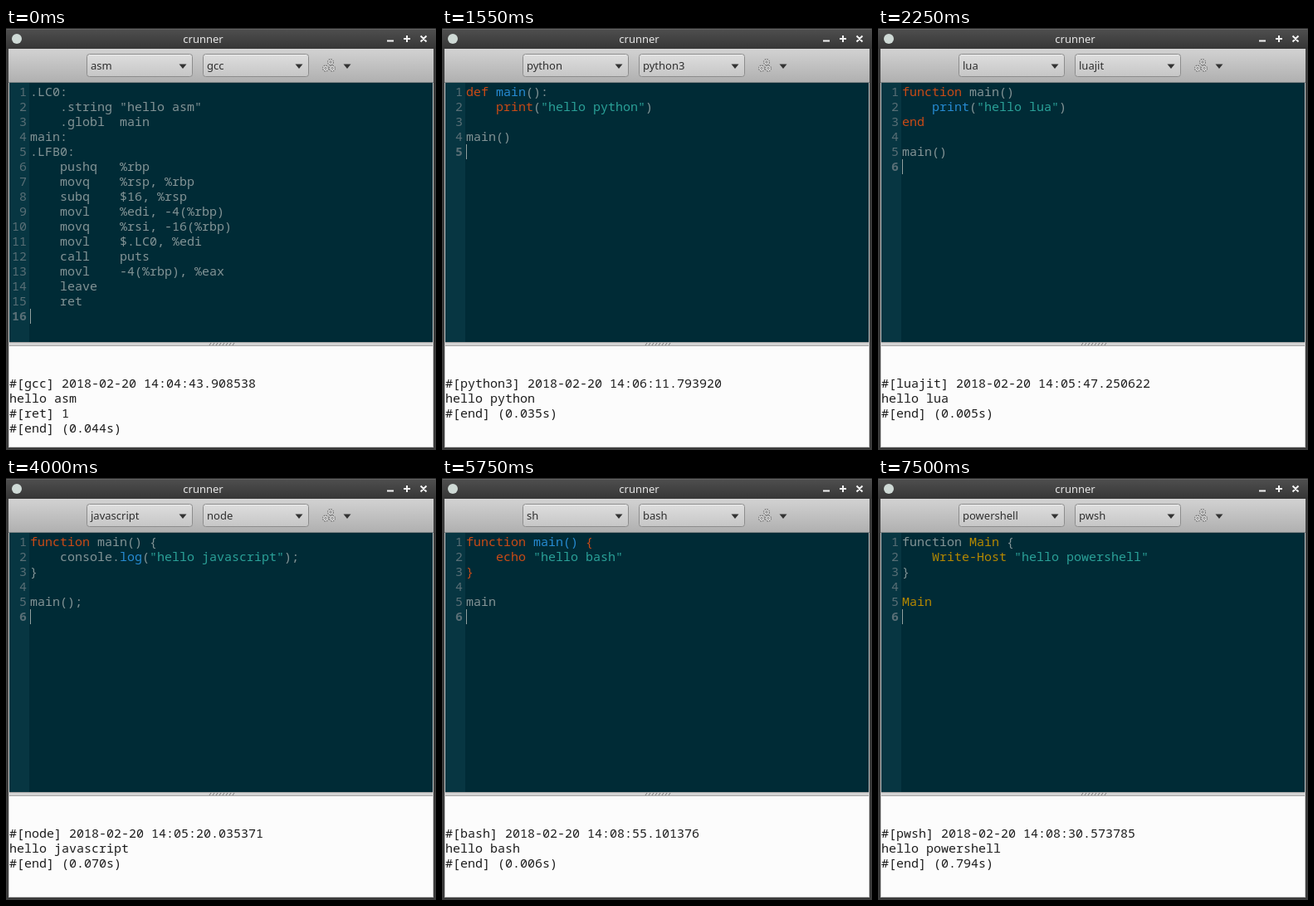
An HTML page for the animation above (8000 ms loop, 518 px wide and 508 px high).

```html
<!DOCTYPE html>
<html lang="en">
<head>
<meta charset="utf-8">
<title>crunner</title>
<style>
html, body { margin: 0; width: 100%; height: 100%; overflow: hidden; background: #3c3c3c; }
.window { position: relative; width: 518px; height: 508px; overflow: hidden; }
.window svg { position: absolute; left: 0; top: 0; }
.title { position: absolute; left: 0; top: 0; width: 475px; text-align: center; color: #e6e6e6; }
.title, .pick { font: 13px/26px "Noto Sans", "Open Sans", sans-serif; }
.pick { position: absolute; top: 32px; color: #2f2f2f; }
.lang { left: 102px; }
.tool { left: 242px; }

.reel { position: absolute; left: 0; top: 0; animation: reel 8s step-end infinite; }
.scene { position: relative; width: 518px; height: 508px; overflow: hidden; }
@keyframes reel {
  0% { transform: translateY(0); }
  6.25% { transform: translateY(-508px); }
  28.125% { transform: translateY(-1016px); }
  50% { transform: translateY(-1524px); }
  71.875% { transform: translateY(-2032px); }
  93.75%, 100% { transform: translateY(-2540px); }
}

.code, .out {
  position: absolute; margin: 0; white-space: pre;
  font: 15px/18px "Noto Sans Mono", "DejaVu Sans Mono", monospace;
  font-variant-ligatures: none;
}
.code { left: 29px; top: 67px; color: #839496; counter-reset: line; }
.code div { position: relative; height: 18px; counter-increment: line; }
.code div::before {
  content: counter(line); position: absolute; left: -29px; width: 25px;
  text-align: right; color: #586e75;
}
.code div:last-child::before { font-weight: bold; }
.code div:last-child::after {
  content: ""; position: absolute; left: 0; top: 1px; width: 1px; height: 18px; background: #93a1a1;
}
.out { left: 4px; top: 418px; color: #1c1c1c; }
i { font-style: normal; }
.k { color: #cb4b16; }
.f { color: #268bd2; }
.s { color: #2aa198; }
.y { color: #b58900; }
</style>
</head>
<body>
<div class="window">
  <svg width="518" height="508">
    <defs>
      <linearGradient id="bar" x2="0" y2="1"><stop stop-color="#505050"/><stop offset="1" stop-color="#363636"/></linearGradient>
      <linearGradient id="tools" x2="0" y2="1"><stop stop-color="#d2d2d2"/><stop offset="1" stop-color="#b0b0b0"/></linearGradient>
      <linearGradient id="face" x2="0" y2="1"><stop stop-color="#dedede"/><stop offset="1" stop-color="#c6c6c6"/></linearGradient>
      <path id="arrow" d="M-4.5-2.5h9L0 3z" fill="#333"/>
      <g id="combo">
        <rect x=".5" y=".5" width="127" height="27" rx="3" fill="url(#face)" stroke="#8c8c8c"/>
        <path d="M3 1.5h122" stroke="#ececec"/>
        <use href="#arrow" x="116" y="15"/>
      </g>
      <g id="gear" fill="none" stroke="#707070">
        <circle r="3.4" stroke-width="1.2" stroke-dasharray="1.7 .95" fill="#e2e2e2"/>
        <circle r="1.2" stroke-width=".9"/>
      </g>
    </defs>
    <rect width="518" height="508" fill="#3c3c3c"/>
    <rect width="518" height="25" fill="url(#bar)"/>
    <path d="M0 .5h518" stroke="#262626"/>
    <path d="M1 1.5h516" stroke="#626262"/>
    <circle cx="13" cy="13" r="6" fill="#cfdad6"/>
    <path d="M459 15.5h8M479 13h8M483 9v8M499.5 9.5l7 7m0-7l-7 7" stroke="#f2f2f2" stroke-width="2" fill="none"/>
    <rect x="3" y="25" width="512" height="480" fill="#c8c8c8"/>
    <rect x="3" y="25" width="512" height="40" fill="url(#tools)"/>
    <path d="M3 65.5h512" stroke="#7d8486"/>
    <use href="#combo" x="97" y="31"/>
    <use href="#combo" x="237" y="31"/>
    <use href="#gear" x="391" y="41"/>
    <use href="#gear" x="385" y="48.5"/>
    <use href="#gear" x="393" y="48.5"/>
    <use href="#arrow" x="411" y="46"/>
    <rect x="4" y="66" width="510" height="312" fill="#002b36"/>
    <rect x="4" y="66" width="24" height="312" fill="#073642"/>
    <path d="M4 378.5h510M4 382.5h510" stroke="#a4a4a4"/>
    <path d="M4 380.5h510" stroke="#d4d4d4" stroke-width="3"/>
    <path d="M245 382l2-3m2 3l2-3m2 3l2-3m2 3l2-3m2 3l2-3m2 3l2-3m2 3l2-3m2 3l2-3" stroke="#7c7c7c" fill="none"/>
    <rect x="4" y="383" width="510" height="121" fill="#fcfcfc"/>
  </svg>
  <div class="title">crunner</div>

  <div class="reel">
    <div class="scene">
      <span class="pick lang">asm</span><span class="pick tool">gcc</span>
      <div class="code"><div>.LC0:</div><div>    .string "hello asm"</div><div>    .globl  main</div><div>main:</div><div>.LFB0:</div><div>    pushq   %rbp</div><div>    movq    %rsp, %rbp</div><div>    subq    $16, %rsp</div><div>    movl    %edi, -4(%rbp)</div><div>    movq    %rsi, -16(%rbp)</div><div>    movl    $.LC0, %edi</div><div>    call    puts</div><div>    movl    -4(%rbp), %eax</div><div>    leave</div><div>    ret</div><div></div></div>
      <pre class="out">#[gcc] 2018-02-20 14:04:43.908538
hello asm
#[ret] 1
#[end] (0.044s)</pre>
    </div>

    <div class="scene">
      <span class="pick lang">python</span><span class="pick tool">python3</span>
      <div class="code"><div><i class="k">def</i> <i class="f">main</i>():</div><div>    <i class="k">print</i>(<i class="s">"hello python"</i>)</div><div></div><div>main()</div><div></div></div>
      <pre class="out">#[python3] 2018-02-20 14:06:11.793920
hello python
#[end] (0.035s)</pre>
    </div>

    <div class="scene">
      <span class="pick lang">lua</span><span class="pick tool">luajit</span>
      <div class="code"><div><i class="k">function</i> main()</div><div>    <i class="f">print</i>(<i class="s">"hello lua"</i>)</div><div><i class="k">end</i></div><div></div><div>main()</div><div></div></div>
      <pre class="out">#[luajit] 2018-02-20 14:05:47.250622
hello lua
#[end] (0.005s)</pre>
    </div>

    <div class="scene">
      <span class="pick lang">javascript</span><span class="pick tool">node</span>
      <div class="code"><div><i class="k">function</i> main() {</div><div>    console.<i class="f">log</i>(<i class="s">"hello javascript"</i>);</div><div>}</div><div></div><div>main();</div><div></div></div>
      <pre class="out">#[node] 2018-02-20 14:05:20.035371
hello javascript
#[end] (0.070s)</pre>
    </div>

    <div class="scene">
      <span class="pick lang">sh</span><span class="pick tool">bash</span>
      <div class="code"><div><i class="k">function</i> <i class="f">main()</i> <i class="k">{</i></div><div>    <i class="k">echo</i> <i class="s">"hello bash"</i></div><div><i class="k">}</i></div><div></div><div>main</div><div></div></div>
      <pre class="out">#[bash] 2018-02-20 14:08:55.101376
hello bash
#[end] (0.006s)</pre>
    </div>

    <div class="scene">
      <span class="pick lang">powershell</span><span class="pick tool">pwsh</span>
      <div class="code"><div>function <i class="y">Main</i> {</div><div>    <i class="y">Write-Host</i> <i class="s">"hello powershell"</i></div><div>}</div><div></div><div><i class="y">Main</i></div><div></div></div>
      <pre class="out">#[pwsh] 2018-02-20 14:08:30.573785
hello powershell
#[end] (0.794s)</pre>
    </div>
  </div>
</div>
</body>
</html>
```
